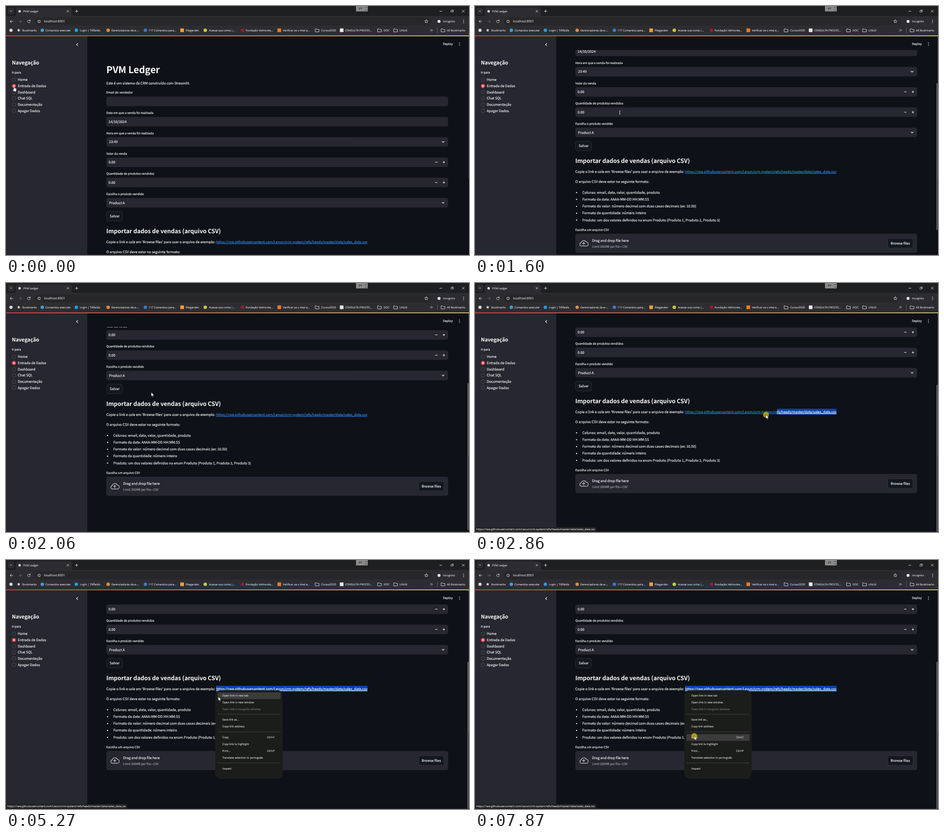
Recreate the animation shown at these times as an HTML page. Size 1020x549 px, loop 8 s.

```html
<!DOCTYPE html>
<html lang="pt">
<head>
<meta charset="utf-8">
<title>PVM Ledger</title>
<style>
  html, body { margin: 0; width: 100%; height: 100%; overflow: hidden; background: #0e1117; }
  svg { display: block; width: 100vw; height: 100vh; }
  text { color: #fafafa; fill: currentColor; stroke: currentColor; stroke-width: .16; white-space: pre; text-rendering: geometricPrecision; }
  .page text { font-family: "Noto Sans CJK JP", "Noto Sans CJK SC", "Noto Sans CJK", "Noto Sans", sans-serif; }
  .ui text { font-family: "Open Sans", "Noto Sans", sans-serif; color: #e6e6e6; stroke-width: .1; }
  .page .bold { font-weight: 700; letter-spacing: -.005em; stroke: none; }
  .mid { text-anchor: middle; }
  .page .dim { color: #a3a4a9; }
  .ui .off { color: #7d7f7d; }
  .ui .dark { color: #1c1c1c; }
  .page .link { color: #2f8cf0; text-decoration: underline; }
  .page .picked { color: #fff; text-decoration: underline; }
  .line { fill: none; stroke: #e8e8e8; stroke-linecap: round; stroke-linejoin: round; }
  .field { fill: #262730; }
  .button { fill: #131720; stroke: #41444c; stroke-width: .6; }
</style>
</head>
<body>
<svg id="stage" viewBox="0 0 1020 549" preserveAspectRatio="none"></svg>
<script>
const LOOP = 8000;
const URL_TEXT = 'https://raw.githubusercontent.com/Levun/crm-system/refs/heads/master/data/sales_data.csv';
const BODY = 7.6, SMALL = 6.65, UI = 6;

// y is the middle of the capital letters
const text = (x, y, str, size = BODY, cls = '') =>
  `<text x="${x}" y="${(y + size * .36).toFixed(2)}" font-size="${size}" class="${cls}">${str}</text>`;
const rect = (x, y, w, h, r, attrs) =>
  `<rect x="${x}" y="${y}" width="${w}" height="${h}" rx="${r}" ${attrs}/>`;
const dot = (x, y, r, fill) => `<circle cx="${x}" cy="${y}" r="${r}" fill="${fill}"/>`;
const line = (d, width = .9, attrs = '') => `<path class="line" d="${d}" stroke-width="${width}" ${attrs}/>`;
const fill = color => `fill="${color}"`;
const dots = (x, y) => [-3, 0, 3].map(d => dot(x, y + d, .85, '#f0f0f0')).join('');
const folder = x => line(`M${x - 4} 50.5h3l1 1.2h4v5.3h-8z`);
const star = (x, y) => {
  const points = Array.from({ length: 10 }, (_, i) => {
    const r = i % 2 ? 1.7 : 3.9, a = i * Math.PI / 5;
    return (x + r * Math.sin(a)).toFixed(2) + ' ' + (y - r * Math.cos(a)).toFixed(2);
  });
  return `M${points.join('L')}Z`;
};

function browser() {
  const bookmarks = [
    [80, 87, 'Comandos executar', '#3f9fd0'],
    [155, 163, 'Login | Tillfields', '#1a9fe0'],
    [225, 232, 'Gerenciadores de e-...', '#e58a3a'],
    [307, 314, '117 Comandos para...', '#3d78c8'],
    [388, 396, 'Filegarden', '#f0a030', true],
    [439, 447, 'Acesse sua conta |...', '#c6cc35'],
    [521, 528, 'Fundação Velmonte...', '#a01830'],
    [602, 610, 'Verificar se o imei e...', '#f07a20', true],
    [739.5, 747, 'CONSULTA PROCES...', '#ececec', true]
  ];
  const folders = [[685.5, 694, 'Cursos2020'], [823, 832, 'DOC'], [858.5, 867, 'LINUX'], [963, 971.5, 'All Bookmarks']];
  return rect(0, 0, 1020, 66, 0, fill('#1e1f21')) +
    rect(0, 22, 1020, 43.5, 0, fill('#2d2d31')) +
    rect(4, 4, 14, 14, 4, fill('#2d2d31')) + line('M9.2 10.4l1.8 1.8 1.8-1.8') +
    `<path d="M18 22q4 0 4-4V8q0-5 5-5h113q5 0 5 5v10q0 4 4 4z" fill="#2d2d31"/>` +
    dot(30, 11.7, 2.6, '#f0f0f0') + text(38, 11.7, 'PVM Ledger', UI) +
    line('M134.3 9.5l4 4m0-4l-4 4M152.5 11.5h6m-3-3v6') +
    line('M955.5 11.5h5M1004.8 9l5 5m0-5l-5 5') +
    line('M980.5 10h3.6v3.6h-3.6zM982 10v-1.3h3.6v3.6h-1.5', .7) +
    rect(771, 0, 26, 12, 0, fill('#8a8a8a')) + text(781, 6, 'PT', UI, 'mid dark') +
    line('M791.5 3.3h3M791.5 9.2h1m1.5 0h1', .8, 'style="stroke:#1c1c1c"') +
    line('M15 34H9m2.8-2.8L9 34l2.8 2.8') +
    line('M28 34h6m-2.8-2.8L34 34l-2.8 2.8', .9, 'opacity=".35"') +
    line('M53 32.4a2.9 2.9 0 1 0 .4 2.2M53.4 30.6v2h-2') +
    rect(64, 25, 873, 18, 9, fill('#27272a')) +
    line('M70 34a3 3 0 1 1 6 0a3 3 0 1 1-6 0M73 34v1.4M73 32.4v.1', .8) +
    text(84, 34, 'localhost:8501', 6.8) +
    line(star(926, 34), .8) +
    dot(954, 34, 3.3, '#e3e3e3') + text(963, 34, 'Incognito', UI) + dots(1008, 34) +
    dot(11, 53.5, 3.6, '#d8d8d8') +
    `<path d="${star(28, 53.5)}" fill="#dcdcdc"/>` + text(36, 53.5, 'Bookmarks', UI) +
    bookmarks.map(([ix, x, label, color, square]) =>
      (square ? rect(ix - 4, 49.5, 8, 8, .5, fill(color)) : dot(ix, 53.5, 3.8, color)) + text(x, 53.5, label, UI)).join('') +
    folders.map(([ix, x, label]) => folder(ix) + text(x, 53.5, label, UI)).join('') +
    line('M935 51.5l2 2-2 2m2.8-4l2 2-2 2') + line('M950.5 48v11', .9, 'opacity=".3"');
}

function sidebar() {
  const pages = ['Home', 'Entrada de Dados', 'Dashboard', 'Chat SQL', 'Documentação', 'Apagar Dados'];
  return rect(0, 66, 179, 483, 0, fill('#262730')) +
    line('M157.9 82.5l-2.5 2.5 2.5 2.5', 1.3) +
    text(13, 124.5, 'Navegação', 11.27, 'bold') + text(13, 147, 'Ir para', SMALL) +
    pages.map((label, i) => {
      const y = 162.7 + 13.64 * i;
      const mark = i === 1
        ? dot(17.5, y, 4.4, '#ff4b4b') + dot(17.5, y, 1.6, '#fafafa')
        : `<circle cx="17.5" cy="${y}" r="4" fill="#262730" stroke="#585a62" stroke-width=".8"/>`;
      return mark + text(26, y, label);
    }).join('');
}

function form() {
  const fields = [
    ['Email do vendedor', ''],
    ['Data em que a venda foi realizada', '14/10/2024'],
    ['Hora em que a venda foi realizada', '23:49', 'select'],
    ['Valor da venda', '0.00', 'number'],
    ['Quantidade de produtos vendidos', '0.00', 'number'],
    ['Escolha o produto vendido', 'Product A', 'select']
  ];
  const rules = [
    'Colunas: email, data, valor, quantidade, produto',
    'Formato da data: AAAA-MM-DD HH:MM:SS',
    'Formato do valor: número decimal com duas casas decimais (ex: 10.50)',
    'Formato da quantidade: número inteiro',
    'Produto: um dos valores definidos na enum Produto (Produto 1, Produto 2, Produto 3)'
  ];
  const controls = {
    select: y => line(`M960.6 ${y - 1.2}l2.4 2.4 2.4-2.4`, 1.3),
    number: y => line(`M946 ${y}h3.8M962.8 ${y}h3.8m-1.9-1.9v3.8`, 1.2)
  };
  return text(221, 140.5, 'PVM Ledger', 20.66, 'bold') +
    text(221, 169.8, 'Este é um sistema de CRM construído com Streamlit.') +
    fields.map(([label, value, kind], i) => {
      const y = 199.8 + 44.7 * i, mid = y + 10.5;
      return text(221, y - 8.7, label, SMALL) + rect(221, y, 753, 21, 4.2, 'class="field"') +
        text(kind === 'select' ? 227 : 226, mid, value) + (kind ? controls[kind](mid) : '');
    }).join('') +
    rect(221.6, 453, 35.2, 21, 4.2, 'class="button"') + text(239.2, 463.5, 'Salvar', BODY, 'mid') +
    text(221, 496, 'Importar dados de vendas (arquivo CSV)', 12.93, 'bold') +
    text(221, 520, "Copie o link e cole em 'Browse files' para usar o arquivo de exemplo:") +
    text(463, 520, URL_TEXT, BODY, 'link') +
    `<g clip-path="url(#picked)">${rect(463, 513.3, 333.3, 13, 0, fill('#0a44b0'))}${text(463, 520, URL_TEXT, BODY, 'picked')}</g>` +
    text(221, 542, 'O arquivo CSV deve estar no seguinte formato:') +
    rules.map((rule, i) => {
      const y = 566 + 15.2 * i;
      return dot(223.8, y + .3, 1.3, '#fafafa') + text(236.5, y, rule);
    }).join('') +
    text(221, 648.3, 'Escolha um arquivo CSV', SMALL) +
    rect(221, 657, 753, 42.3, 4.2, 'class="field"') +
    line('M234.5 684.3a4 4 0 0 1-.4-7.8a6 6 0 0 1 11-1.2a4.5 4.5 0 0 1-.3 9zM239.5 681.5v-5m-2.4 2.2l2.4-2.4 2.4 2.4',
      1.5, 'style="stroke:#b4b5ba"') +
    text(258, 672.2, 'Drag and drop file here') +
    text(258, 686, 'Limit 200MB per file • CSV', SMALL, 'dim') +
    rect(909.3, 667.7, 55.6, 21, 4.2, 'class="button"') + text(937, 678.2, 'Browse files', BODY, 'mid');
}

const MENU = [
  [299, 'Open link in new tab'], [314, 'Open link in new window'], [328.6, 'Open link in incognito window'],
  [352.3, 'Save link as...'], [367.2, 'Copy link address'],
  [391, 'Copy', 'Ctrl+C'], [406, 'Copy link to highlight'], [421, 'Print...', 'Ctrl+P'],
  [436, 'Translate selection to português'], [460, 'Inspect']
];

function menu() {
  return rect(461, 287, 148.5, 195.5, 12, fill('#1b1d1b')) +
    rect(466, 0, 139, 15, 0, 'id="hover" fill="#3a3b3a"') +
    [340, 379, 447.3].map(y => rect(466, y - .4, 139, .8, 0, fill('#4b4d4b'))).join('') +
    MENU.map(([y, label, keys], i) =>
      text(476.5, y, label, UI, i === 2 ? 'off' : '') + (keys ? text(575, y, keys, UI) : '')).join('');
}

const CURSORS = {
  arrow: `<path d="M0 0V9L2.1 7.1 3.5 10.2 4.9 9.6 3.5 6.6H6.3Z" fill="#fff" stroke="#000" stroke-width=".5"/>`,
  hand: `<path d="M-1 .9a1 1 0 0 1 2 0V4l3.2.8q1 .3 .9 1.5L4.6 9.5v2H-.3L-3.3 7.4q-.4-1 .8-1l1.5 1z" fill="#fff" stroke="#000" stroke-width=".5"/>`,
  beam: `<path d="M-1.8-4q1.8 0 1.8 1V3q0 1-1.8 1M1.8-4Q0-4 0-3V3q0 1 1.8 1" fill="none" stroke="#c4c4c4" stroke-width=".8"/>`
};

document.getElementById('stage').innerHTML = `
  <defs>
    <linearGradient id="stripe"><stop stop-color="#f04a4a"/><stop offset="1" stop-color="#fbf584"/></linearGradient>
    <clipPath id="main"><rect x="179" y="97" width="841" height="451"/></clipPath>
    <clipPath id="picked"><rect id="pick" y="510" width="400" height="20"/></clipPath>
  </defs>
  <rect width="1020" height="549" fill="#0e1117"/>
  <g class="page">
    <g clip-path="url(#main)"><g id="scroll">${form()}</g></g>
    ${text(962.5, 84, 'Deploy', SMALL)}${dots(999, 84)}
    ${sidebar()}
  </g>
  ${rect(1016.6, 66, 2.6, 324, 1.3, 'id="thumb" fill="#64676b"')}
  ${rect(1019.3, 66, .7, 315, 0, fill('#55575a'))}
  <g class="ui">
    ${browser()}
    ${rect(0, 65, 1020, 1.5, 0, 'fill="url(#stripe)"')}
    ${rect(0, 548.2, 1020, .8, 0, fill('#3a2530'))}
    <g id="status"><path d="M0 538h264q3 0 3 3v8H0z" fill="#222224"/>${text(3, 543.3, URL_TEXT, UI)}</g>
    <g id="menu">${menu()}</g>
  </g>
  <circle id="press" r="6.4" fill="#c9b20f" opacity=".8"/>
  <g id="cursor">${Object.entries(CURSORS).map(([name, shape]) => `<g id="${name}">${shape}</g>`).join('')}</g>`;

// Bursts of movement: first step, last step, number of steps
const BURSTS = [[0, 0, 1], [590, 1600, 6], [1860, 2860, 6], [3070, 4050, 6], [4460, 4460, 1],
  [4860, 5860, 6], [6060, 6260, 2], [6670, 7460, 5], [7870, 7870, 1]];
const POINTER = [[0, 18, 177], [589, 18, 177], [990, 319, 235], [1600, 319, 235], [2060, 320, 241],
  [2460, 797, 285], [2860, 641, 290.5], [3070, 596, 291], [4050, 465, 290], [5060, 465, 290],
  [5860, 476, 336], [6060, 482, 347], [6260, 483, 356], [6670, 484, 366], [7070, 486, 403], [7460, 483, 388]];
const SCROLL = [[990, 0], [1600, 155], [1860, 205], [2060, 230], [2260, 236]];
const PICK = [[2460, 797], [2660, 745], [2860, 665.5], [3070, 622], [3850, 463]];

function snap(t) {
  const [start, end, count] = BURSTS.filter(b => b[0] <= t).pop();
  if (count === 1) return start;
  const step = (end - start) / (count - 1);
  return start + step * Math.min(count - 1, Math.floor((t - start) / step + .02));
}

function track(keys, t, i = 1) {
  const next = keys.findIndex(k => k[0] > t);
  if (next < 0) return keys[keys.length - 1][i];
  if (next === 0) return keys[0][i];
  const a = keys[next - 1], b = keys[next];
  return a[i] + (b[i] - a[i]) * (t - a[0]) / (b[0] - a[0]);
}

const part = id => document.getElementById(id);
const show = (id, on) => part(id).setAttribute('display', on ? 'inline' : 'none');
const move = (id, x, y) => part(id).setAttribute('transform', `translate(${x} ${y})`);

function draw(time) {
  const t = snap(time);
  const x = track(POINTER, t, 1), y = track(POINTER, t, 2), scroll = track(SCROLL, t);
  move('scroll', 0, -scroll);
  move('thumb', 0, scroll * .672);
  show('thumb', x > 179);
  part('pick').setAttribute('x', track(PICK, t));
  show('status', t >= 2460);

  const open = t >= 5050;
  const item = MENU.find(([mid]) => Math.abs(mid - y) < 7.5);
  show('menu', open);
  show('hover', open && x > 466 && item);
  if (item) part('hover').setAttribute('y', item[0] - 7.2);

  const kind = t < 590 ? 'hand' : t >= 990 && t < 1860 ? 'beam' : 'arrow';
  Object.keys(CURSORS).forEach(name => show(name, name === kind));
  move('cursor', x, y);
  move('press', x, y);
  show('press', (t >= 2450 && t < 4460) || (t >= 4860 && t < 5050) || t >= 7870);
}

function tick() {
  draw(performance.now() % LOOP);
  requestAnimationFrame(tick);
}
tick();
</script>
</body>
</html>
```
